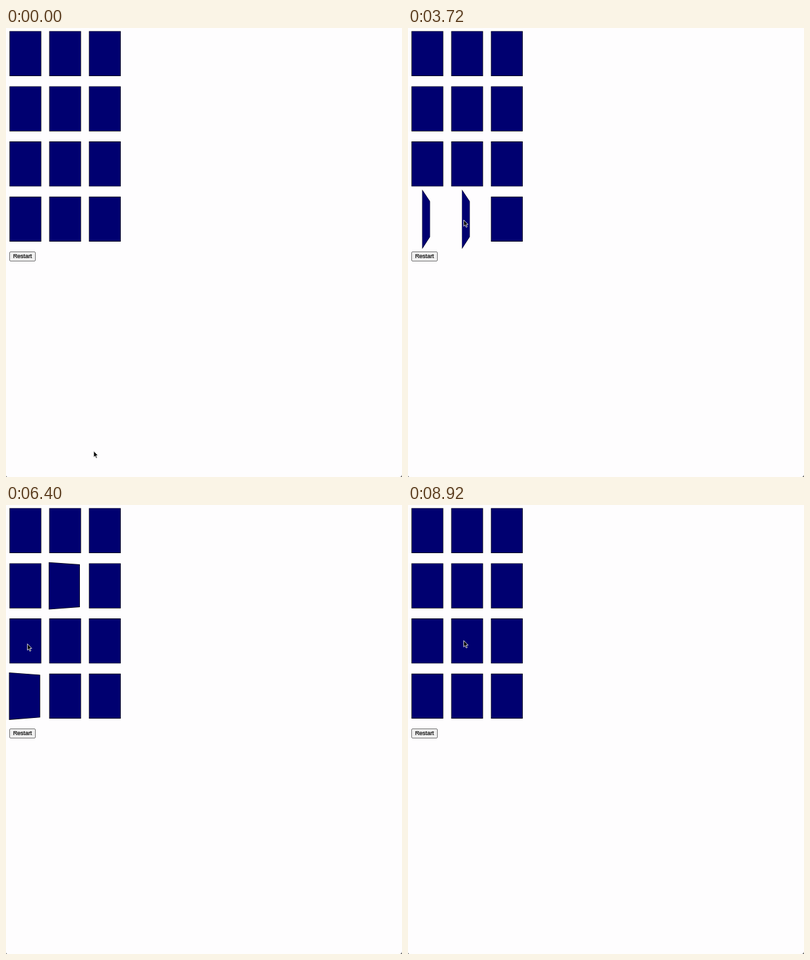
Animation of 600x681 px, one loop 9.16 s. Source, as an HTML page with a canvas:

```html
<!DOCTYPE html>
<html lang="en">
<head>
<meta charset="utf-8">
<title>Card game</title>
<style>
  html, body { margin: 0; width: 100%; height: 100%; overflow: hidden; background: #fefdfe; }
  canvas { position: absolute; left: 0; top: 0; }
  #restart { position: absolute; left: 5px; top: 339px; width: 40px; height: 15px; box-sizing: border-box;
    border: 1px solid #767676; border-radius: 2px; background: #efefef; color: #000;
    font: 8.92px/13px "Liberation Sans", Arial, sans-serif; -webkit-text-stroke: .2px #000;
    text-align: center; white-space: nowrap; }
</style>
</head>
<body>
<div id="restart">Restart</div>
<canvas id="view" width="600" height="681"></canvas>
<script>
const LOOP = 9160, FLIP = 800, WAIT = 1000;
const SCALE = .669, W = 70, H = 100, DEPTH = 140;
const ctx = document.getElementById('view').getContext('2d');

const colors = { 4: '#fff', 6: '#ff9c00', 7: '#ffc0cb', 9: '#007600', 10: '#f00' };

// each round: [time, card] of two clicks; both cards turn back after a wait
const rounds = [
  [[1960, 9], [2455, 10]],
  [[4310, 9], [4850, 4]],
  [[6440, 6], [6930, 7]]
];

// pointer moves: arrival time, duration, end point
const start = [132.5, 641];
const moves = [
  [200, 200, 69, 346], [880, 520, 27, 289], [1900, 580, 40.5, 290.5], [2200, 160, 84, 290.5],
  [4300, 500, 40.5, 290.5], [4480, 150, 82, 209.5], [4700, 200, 82, 126],
  [5760, 300, 76, 156], [6240, 400, 32, 210], [6800, 300, 84, 205]
];

const arrow = new Path2D('M.4.6v9.600l2.200-2 1.500 3.600 1.600-.7-1.500-3.500h2.900z');
const clamp = v => Math.min(1, Math.max(0, v));
const smooth = p => p * p * (3 - 2 * p);

// cubic-bezier(.25, .1, .25, 1)
function ease(p) {
  let lo = 0, hi = 1, u = .5;
  const curve = (a, b) => 3 * a * u * (1 - u) ** 2 + 3 * b * u * u * (1 - u) + u ** 3;
  for (let i = 0; i < 20; i++) {
    u = (lo + hi) / 2;
    if (curve(.25, .25) < p) lo = u; else hi = u;
  }
  return curve(.1, 1);
}

const turn = (t, from) => ease(clamp((t - from) / FLIP));

function angle(card, t) {
  let a = 0;
  for (const round of rounds) {
    const down = round[1][0] + WAIT;
    for (const [up, id] of round) if (id === card) a += turn(t, up) - turn(t, down);
  }
  return a * Math.PI;
}

// card face in perspective, inset by the border width
function face(cx, cy, a, inset, color) {
  const corner = (x, y) => {
    const s = SCALE * DEPTH / (DEPTH + x * Math.sin(a));
    ctx.lineTo(cx + x * Math.cos(a) * s, cy + y * s);
  };
  const l = -W / 2 + inset, r = W / 2 + 2 - inset;
  const top = -H / 2 + inset, bottom = H / 2 + 2 - inset;
  ctx.beginPath();
  corner(l, top);
  corner(r, top);
  corner(r, bottom);
  corner(l, bottom);
  ctx.fillStyle = color;
  ctx.fill();
}

function drawCard(i, t) {
  const cx = 28.7 + 60.2 * (i % 3), cy = 38.15 + 83.7 * Math.floor(i / 3);
  const a = angle(i, t);
  face(cx, cy, a, 0, '#000');
  face(cx, cy, a, 1, Math.cos(a) > 0 ? '#000070' : colors[i]);
}

function drawPointer(t) {
  let [x, y] = start;
  for (const [end, time, toX, toY] of moves) {
    const p = smooth(clamp((t - end + time) / time));
    x += (toX - x) * p;
    y += (toY - y) * p;
  }
  ctx.save();
  ctx.translate(x, y);
  ctx.fillStyle = '#000';
  ctx.fill(arrow);
  ctx.strokeStyle = '#fff';
  ctx.lineWidth = .8;
  ctx.stroke(arrow);
  ctx.restore();
}

function draw(now) {
  const t = now % LOOP;
  ctx.clearRect(0, 0, 600, 681);
  for (let i = 0; i < 12; i++) drawCard(i, t);
  ctx.fillStyle = '#444';
  ctx.fill(new Path2D('M0 679v2h2q-1.500 0-2-2zM600 677.500v3.500h-3.500q3 0 3.500-3.500z'));
  drawPointer(t);
  requestAnimationFrame(draw);
}
requestAnimationFrame(draw);
</script>
</body>
</html>
```
